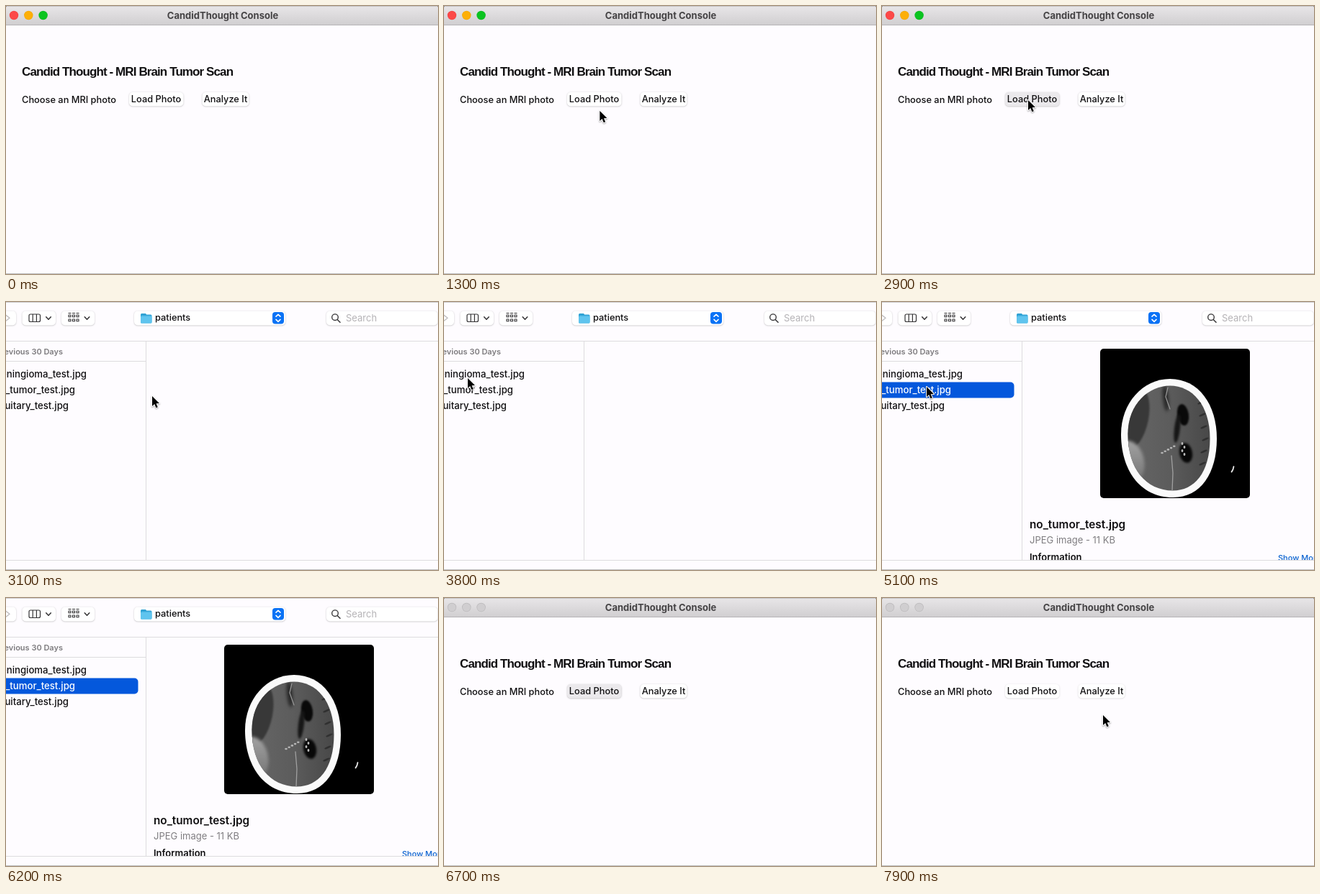
Animation, 600 px wide and 373 px high, one loop 8000 ms. Source, as an HTML page with a canvas:

```html
<!DOCTYPE html>
<html lang="en">
<head>
<meta charset="utf-8">
<title>Scan viewer</title>
<style>
html, body { margin: 0; width: 100%; height: 100%; overflow: hidden; background: #fefcff; }
canvas { display: block; width: 600px; height: 373px; }
</style>
</head>
<body>
<canvas id="stage"></canvas>
<script>
const W = 600, H = 373, LOOP = 8000, STEP = 100;
const UI = 'Inter, "Open Sans", sans-serif';
const PAGE = '#fefcff', INK = '#111012';
const canvas = document.getElementById('stage');
const ctx = canvas.getContext('2d');
const dpr = window.devicePixelRatio || 1;
canvas.width = Math.round(W * dpr);
canvas.height = Math.round(H * dpr);

// Pointer stops: time, x, y
const path = [
  [400, 316, 257], [600, 316, 257], [1500, 202, 130], [2100, 202, 130],
  [2200, 203, 131], [3100, 203, 131], [3800, 33, 106], [3900, 33, 106],
  [4500, 62, 118], [5400, 62, 118], [6000, 545, 369], [6199, 545, 369],
  [7100, 428, 301], [7200, 380, 260], [7400, 380, 260], [7500, 352, 226],
  [7600, 324, 199], [7700, 324, 199], [7800, 310, 170], [7900, 307, 163]
];

function text(s, x, y, size = 12.8, weight = 500, color = INK, align = 'left') {
  ctx.font = `${weight} ${size}px ${UI}`;
  ctx.textAlign = align;
  ctx.fillStyle = color;
  ctx.fillText(s, x, y);
}

function rect(x, y, w, h, color) {
  ctx.fillStyle = color;
  ctx.fillRect(x, y, w, h);
}

function box(x, y, w, h, r, fill) {
  ctx.beginPath();
  ctx.roundRect(x, y, w, h, r);
  ctx.fillStyle = fill;
  ctx.fill();
}

function line(points, color, width) {
  ctx.beginPath();
  points.forEach(([x, y]) => ctx.lineTo(x, y));
  ctx.strokeStyle = color;
  ctx.lineWidth = width;
  ctx.lineCap = ctx.lineJoin = 'round';
  ctx.stroke();
}

function oval(x, y, rx, ry, fill, turn = 0) {
  ctx.beginPath();
  ctx.ellipse(x, y, rx, ry, turn, 0, 7);
  ctx.fillStyle = fill;
  ctx.fill();
}

function control(x, y, w, h, fill = '#fff', shade = 0.26) {
  ctx.save();
  ctx.shadowColor = `rgba(0,0,0,${shade})`;
  ctx.shadowBlur = 2 * dpr;
  ctx.shadowOffsetY = 0.5 * dpr;
  box(x, y, w, h, 5, fill);
  ctx.restore();
}

function drawWindow(t) {
  const active = t < 6700;
  const pressed = t >= 2600 && t < 6800;
  rect(0, 0, W, H, PAGE);
  const bar = ctx.createLinearGradient(0, 0, 0, 27);
  bar.addColorStop(0, '#e8e6e8');
  bar.addColorStop(1, '#d0ced0');
  rect(0, 0, W, 27, '#59585a');
  box(0, 0, W, 27, [2, 2, 0, 0], bar);
  rect(2, 0, W - 4, 1, '#c6c4c6');
  rect(0, 26, W, 1, '#b7b5b7');
  const lights = active
    ? [['#fc4948', '#f24444'], ['#fdaf07', '#f2a706'], ['#0bc420', '#0bba1e']]
    : Array(3).fill(['#d0ced0', '#bbb9bb']);
  lights.forEach(([fill, edge], i) => {
    oval(11 + i * 20.3, 13, 6.2, 6.2, edge);
    oval(11 + i * 20.3, 13, 5.5, 5.5, fill);
  });
  text('CandidThought Console', 301, 17.5, 13, 700, '#454345', 'center');

  ctx.font = 'bold 17px "Liberation Sans", Arial, sans-serif';
  ctx.letterSpacing = '-0.9px';
  ctx.textAlign = 'left';
  ctx.fillStyle = INK;
  ctx.fillText('Candid Thought - MRI Brain Tumor Scan', 22, 96.5);
  ctx.letterSpacing = '0px';

  text('Choose an MRI photo', 22, 135);
  const shade = t >= 6800 ? 0.16 : 0.26;
  control(171, 120, 75.5, 19.5, pressed ? '#ebe9ec' : '#fff', shade);
  control(272.5, 120, 65, 19.5, '#fff', shade);
  text('Load Photo', 208.5, 134, undefined, 500, INK, 'center');
  text('Analyze It', 305, 134, undefined, 500, INK, 'center');
  rect(0, 372, W, 1, '#bebdbf');
}

function drawToolbar() {
  control(-20, 12.5, 34, 20);
  line([[-1, 17.5], [5, 22.3], [-1, 27]], '#bcbbbd', 1.3);
  control(22.5, 12.5, 46.5, 20);
  control(77, 12.5, 46, 20);
  ctx.strokeStyle = '#333234';
  ctx.lineWidth = 1.2;
  ctx.beginPath();
  ctx.roundRect(32, 17, 15.5, 10.5, 2);
  ctx.moveTo(37.2, 17); ctx.lineTo(37.2, 27.5);
  ctx.moveTo(42.4, 17); ctx.lineTo(42.4, 27.5);
  ctx.stroke();
  for (let i = 0; i < 3; i++) {
    for (const y of [18, 24]) {
      ctx.lineWidth = 1.1;
      ctx.strokeRect(87 + i * 5.5, y, 3, 2.8);
    }
    rect(86.5 + i * 5.5, 15, 4, 1, '#333234');
  }
  for (const x of [59, 112.5]) line([[x - 3.3, 20.7], [x, 24.2], [x + 3.3, 20.7]], '#333234', 1.5);

  control(178, 12.5, 210, 20);
  box(187, 16, 8, 5, 1.5, '#2c9fd0');
  box(187, 17.5, 15.5, 12, 1.5, '#35a6d8');
  box(187, 19.5, 15.5, 10, 1.5, '#5fc4ee');
  text('patients', 207, 26.3);
  box(370, 14, 16, 16.5, 4, '#0a72f5');
  line([[375, 20.2], [378, 17.3], [381, 20.2]], '#fff', 1.6);
  line([[375, 24.4], [378, 27.3], [381, 24.4]], '#fff', 1.6);

  control(445, 12.5, 154.5, 20);
  ctx.beginPath();
  ctx.arc(457, 21.2, 4.3, 0, 7);
  ctx.strokeStyle = '#3a393b';
  ctx.lineWidth = 1.4;
  ctx.stroke();
  line([[460.2, 24.5], [464, 28.2]], '#3a393b', 1.6);
  text('Search', 472, 27, 13, 400, '#b5b3b6');
}

function blob(x, y, w, h, tone, blur, turn = 0) {
  ctx.filter = `blur(${blur * dpr}px)`;
  oval(x, y, w, h, tone, turn);
  ctx.filter = 'none';
}

// Egg outline inset from the skull's outer edge
function skull(d) {
  ctx.beginPath();
  ctx.moveTo(400, 107 + d);
  ctx.bezierCurveTo(440 - d, 107 + d, 465 - d, 143, 465 - d, 190);
  ctx.bezierCurveTo(465 - d, 238, 443 - d, 272 - d, 404, 272 - d);
  ctx.bezierCurveTo(357 + d, 272 - d, 332 + d, 232, 332 + d, 184);
  ctx.bezierCurveTo(332 + d, 141, 362 + d, 107 + d, 400, 107 + d);
  ctx.closePath();
}

function drawScan() {
  ctx.save();
  ctx.beginPath();
  ctx.roundRect(303, 65, 208, 208, 5);
  ctx.clip();
  rect(303, 65, 208, 208, '#000');
  skull(0);
  ctx.fillStyle = '#fafafa';
  ctx.fill();
  skull(9.5);
  ctx.clip();
  const tissue = ctx.createLinearGradient(342, 0, 456, 0);
  tissue.addColorStop(0, '#666');
  tissue.addColorStop(0.5, '#5c5c5c');
  tissue.addColorStop(1, '#484848');
  rect(330, 105, 140, 170, tissue);
  blob(352, 162, 18, 42, '#383838', 1.3, 0.2);
  const pool = ctx.createLinearGradient(0, 193, 0, 250);
  pool.addColorStop(0, '#a2a2a2');
  pool.addColorStop(1, '#747474');
  blob(345, 222, 19, 29, pool, 2, -0.2);
  blob(394, 134, 4, 18, '#292929', 2, -0.1);
  blob(418, 157, 8, 15, '#090909', 1.3, -0.15);
  blob(410, 176, 4, 20, '#161616', 1.5, 0.12);
  blob(422, 210, 9, 14, '#080808', 1.5, -0.2);
  for (let i = 0; i < 6; i++) blob(449 - Math.abs(i - 3) * 2, 140 + i * 17, 5, 1.3, '#303030', 0.7, -0.4);
  line([[397, 119], [394, 132], [400, 149]], '#999', 1.2);
  line([[402, 214], [404, 238], [403, 263]], '#a0a0a0', 1.3);
  for (let i = 0; i < 5; i++) oval(389 + i * 4.2, 210 - i * 2.3, 1.8, 1.3, '#b5b5b5');
  for (let i = 0; i < 4; i++) oval(417 + i % 2 * 3, 197 + i * 5, 1.4, 2, '#bcbcbc');
  ctx.restore();
  line([[488.5, 229], [487.5, 233], [485.5, 236.5]], '#e8e8e8', 1.8);
}

function drawDialog(t) {
  rect(0, 0, W, H, PAGE);
  rect(0, 0, W, 1, '#cfcdd0');
  drawToolbar();
  const rule = '#dddcde';
  rect(0, 54, W, 1, rule);
  rect(0, 82, 194, 1, rule);
  rect(194, 54, 1, 305, rule);
  text('Previous 30 Days', 79, 73, 11, 600, '#7d7b7e', 'right');
  const selected = t >= 4800;
  if (selected) box(-10, 111.5, 193.5, 22, 5, '#0458dc');
  const item = (name, x, y, color) => text(name, x, y, 13.2, 500, color, 'right');
  item('meningioma_test.jpg', 112, 104.5);
  item('no_tumor_test.jpg', 96, 126.7, selected ? '#fff' : INK);
  item('pituitary_test.jpg', 87, 149);
  if (t >= 5000) {
    drawScan();
    text('no_tumor_test.jpg', 205, 315, 15.3, 600);
    text('JPEG image - 11 KB', 205, 335.5, 13, 400, '#7f7d80');
    text('Information', 205, 360, 13, 600);
    text('Show More', 550, 360, 11, 500, '#0a62d0');
    rect(0, 359, W, 13, PAGE);
  }
  rect(0, 359, W, 1, rule);
  rect(0, 372, W, 1, '#bebdbf');
}

function pointerAt(t) {
  if (t < 400 || (t >= 6200 && t < 7100)) return null;
  const i = path.findIndex(p => p[0] > t);
  if (i < 0) return path[path.length - 1].slice(1);
  const [t0, x0, y0] = path[i - 1], [t1, x1, y1] = path[i];
  const u = (t - t0) / (t1 - t0), k = u * u * (3 - 2 * u);
  return [x0 + (x1 - x0) * k, y0 + (y1 - y0) * k];
}

function drawPointer([x, y]) {
  ctx.save();
  ctx.translate(x, y);
  ctx.beginPath();
  [[0, 0], [0, 14], [3.2, 11], [5.4, 16.2], [7.8, 15.2], [5.6, 10.2], [10, 10]]
    .forEach(([a, b]) => ctx.lineTo(a, b));
  ctx.closePath();
  ctx.shadowColor = 'rgba(0,0,0,.35)';
  ctx.shadowBlur = 2 * dpr;
  ctx.shadowOffsetY = dpr;
  ctx.lineJoin = 'round';
  ctx.lineWidth = 2;
  ctx.strokeStyle = '#fff';
  ctx.stroke();
  ctx.shadowColor = 'transparent';
  ctx.fillStyle = '#000';
  ctx.fill();
  ctx.restore();
}

function draw(t) {
  ctx.setTransform(dpr, 0, 0, dpr, 0, 0);
  if (t >= 3100 && t < 6700) drawDialog(t);
  else drawWindow(t);
  const pointer = pointerAt(t);
  if (pointer) drawPointer(pointer);
}

const start = performance.now();
function tick() {
  const t = (performance.now() - start) % LOOP;
  draw(Math.floor(t / STEP) * STEP);
  requestAnimationFrame(tick);
}
tick();
</script>
</body>
</html>
```
